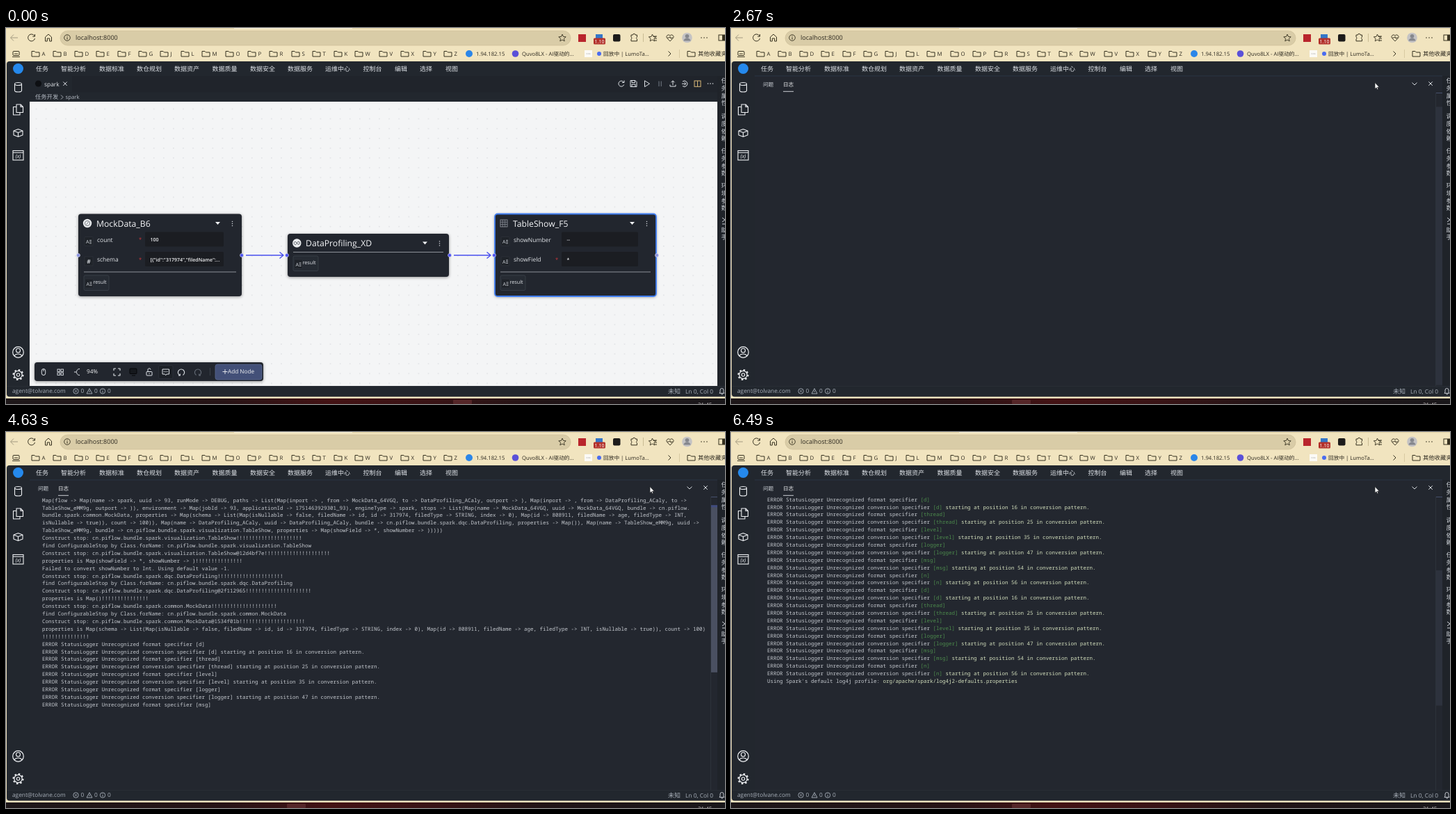
An HTML page that plays this animation: 1034 by 541 pixels, repeating every 8 s.

```html
<!DOCTYPE html>
<html lang="zh-CN">
<head>
<meta charset="utf-8">
<title>Task flow run</title>
<style>
html, body { margin: 0; width: 100%; height: 100%; overflow: hidden; background: #f1e4bf; }
svg { display: block; width: 100vw; height: 100vh; }
text { font-family: "Open Sans", "Noto Sans CJK SC", "Noto Sans CJK", sans-serif; white-space: pre; text-rendering: geometricPrecision; }
#log text { font-family: "Noto Sans Mono", "DejaVu Sans Mono", monospace; font-size: 7.5px; fill: #c3c7cd; }
#log.lit .key { fill: #4c8a4c; }
#log.lit .tail { fill: #d3dfbd; }
</style>
</head>
<body>
<svg id="stage" viewBox="0 0 1034 541" preserveAspectRatio="none">
  <defs>
    <pattern id="dots" x="37" y="110" width="14.1" height="14.1" patternUnits="userSpaceOnUse">
      <rect x="6" y="6" width="1" height="1" fill="#bfc2c9"/>
    </pattern>
    <linearGradient id="task">
      <stop offset="0" stop-color="#1d1719"/><stop offset=".3" stop-color="#261315"/>
      <stop offset=".45" stop-color="#431214"/><stop offset=".6" stop-color="#381315"/>
      <stop offset=".75" stop-color="#211416"/><stop offset="1" stop-color="#19171a"/>
    </linearGradient>
    <clipPath id="logClip"><rect x="34" y="93" width="979" height="421"/></clipPath>
    <filter id="soft" x="-20%" y="-20%" width="140%" height="150%">
      <feDropShadow dx="0" dy="1" stdDeviation="2" flood-color="#000" flood-opacity=".4"/>
    </filter>
  </defs>
  <g id="browser"></g>
  <g id="app"></g>
  <g id="flow"></g>
  <g id="panel">
    <g id="panelHead"></g>
    <g clip-path="url(#logClip)"><g id="log"></g></g>
  </g>
  <g id="tip"></g>
  <path id="cursor" d="M0 0V9.2L2.1 7.3L3.5 10.3L4.9 9.7L3.6 6.7H6.4Z" fill="#fff" stroke="#16181c" stroke-width=".7"/>
</svg>
<script>
const NS = 'http://www.w3.org/2000/svg';
const $ = id => document.getElementById(id);
let layer;

function add(tag, attrs, parent = layer) {
  const el = document.createElementNS(NS, tag);
  set(el, attrs);
  parent.appendChild(el);
  return el;
}
function set(el, attrs) {
  for (const k in attrs) el.setAttribute(k, attrs[k]);
}
const rect = (x, y, width, height, fill, more) => add('rect', { x, y, width, height, fill, ...more });
const disc = (cx, cy, r, fill, more) => add('circle', { cx, cy, r, fill, ...more });
const ring = (cx, cy, r, stroke, w = 1) => disc(cx, cy, r, 'none', { stroke, 'stroke-width': w });
const line = (d, stroke = '#dfe3e8', w = 1, more) =>
  add('path', { d, fill: 'none', stroke, 'stroke-width': w, 'stroke-linejoin': 'round', ...more });
// y is the vertical middle of the text
function label(x, y, str, size, fill, more) {
  const el = add('text', { x, y: y + size * 0.36, 'font-size': size, fill, ...more });
  el.textContent = str;
  return el;
}

function drawBrowser() {
  layer = $('browser');
  const ink = '#35301f';
  rect(0, 0, 1034, 541, '#f1e4bf');
  rect(0, 0, 1034, 1.2, '#e6d7ac');
  rect(328, 0, 170, 1.2, '#f8f0d8');
  line('M17 14H7M11 9.5L6.5 14L11 18.5', '#a39a80');
  line('M41 11.5A5 5 0 1 0 41.5 15M41.5 9V12.2H38.3', ink);
  line('M56.5 19V13L61 9L65.5 13V19H62.7V15H59.3V19Z', ink);
  rect(78, 4, 734, 21, '#d9cca7', { rx: 10.5, stroke: '#c9bb94', 'stroke-width': .6 });
  ring(88, 14, 4.3, ink, .9);
  line('M88 13.3V16.5M88 11.3V12.2', ink);
  label(100, 14, 'localhost:8000', 9, '#2c281f');
  const star = (x, y) => line(`M${x} ${y - 5}l1.5 3.4 3.7.4-2.8 2.5.8 3.6-3.2-1.9-3.2 1.9.8-3.6-2.8-2.5 3.7-.4Z`, ink, .9);
  star(800, 14);
  rect(823, 9, 11, 11, '#b9252c');
  rect(848, 9, 10, 9, '#3577c8');
  rect(845, 14.5, 17, 9, '#b3322c', { rx: 1.5 });
  label(853.5, 19.2, '1.10', 7, '#fff', { 'text-anchor': 'middle' });
  rect(873, 9, 10.5, 10.5, '#1c1b1a', { rx: 2 });
  line('M899 10H901.5A1.7 1.7 0 0 1 905 10H907.5V13A1.7 1.7 0 0 0 907.5 16V18.8H899V16A1.7 1.7 0 0 0 899 13Z', ink);
  line('M916.5 8V20', '#c9bb94');
  star(929.5, 14);
  line('M931 12H936M933 15H936M933 18H936', ink);
  line('M955 19L950.5 14.5A2.8 2.8 0 0 1 955 11A2.8 2.8 0 0 1 959.5 14.5ZM951 14H954L955 12.5L956.5 15.5L957 14H959', ink, .9);
  disc(979.5, 14, 7.3, '#c4c3c4');
  disc(979.5, 11.8, 2.8, '#85878d');
  add('path', { d: 'M974.5 18.5A5 4 0 0 1 984.5 18.5Z', fill: '#85878d' });
  [1000, 1004, 1008].forEach(x => disc(x, 14, .8, ink));
  rect(1025, 10, 12, 8, 'none', { stroke: ink });
  rect(1030, 10, 6, 8, ink);

  rect(10, 33.5, 9, 6, 'none', { stroke: ink, rx: 1 });
  line('M9 41.5H20M12 37H17', ink, .9);
  const folder = x => line(`M${x} 33.5H${x + 4}L${x + 5.5} 35H${x + 11}V41H${x}Z`, ink, 1);
  const starts = [37, 68, 99, 130, 161, 191, 222, 252, 282, 316, 348, 379, 411, 441, 472, 502, 537, 568, 600, 630];
  [...'ABDEFGJLMOPRSTKWVXYZ'].forEach((c, i) => {
    folder(starts[i]);
    label(starts[i] + 14.5, 37, c, 7.8, '#2c281f');
  });
  const mark = (x, text, cx, r, color) => { disc(cx, 37, r, color); label(x, 37, text, 7.7, '#2c281f'); };
  mark(676, '1.94.182.15', 666, 5, '#2b86e8');
  mark(742, 'Quvo8LX - AI驱动的...', 732.5, 4.8, '#5a50d8');
  rect(832, 32, 11, 10, '#fbfaf6');
  label(837.5, 37, 'note', 3, '#999', { 'text-anchor': 'middle' });
  mark(859, '回放中 | LumoTa...', 853, 3, '#4a6cf0');
  line('M952.5 33.5L956 37L952.5 40.5', ink);
  line('M968.5 31V43', '#d8caa2');
  folder(980);
  label(995, 37, '其他收藏夹', 8.3, '#2c281f');

  rect(0, 533, 1034, 8, 'url(#task)');
  rect(643, 535, 27, 6, '#552628', { id: 'taskSpot', rx: 1 });
  label(995, 542, '21:45', 8, '#c9c4c4');
}

function drawApp() {
  layer = $('app');
  rect(1, 48, 1040, 482.5, '#22272e', { rx: 4 });
  rect(34, 69, 989, 37, '#20242b');
  rect(34, 92.5, 989, 13.5, '#22272e');
  rect(1023, 69, 11, 446, '#1f2329');
  rect(1, 515, 1033, .7, '#2b3038');
  disc(17.5, 58.5, 7.5, '#2589ec');
  const menu = { 43: '任务', 79: '智能分析', 134: '数据标准', 188: '数仓规划', 242: '数据资产', 296.5: '数据质量', 351: '数据安全',
    405: '数据服务', 459: '运维中心', 513.5: '控制台', 559: '编辑', 595: '选择', 632: '视图' };
  for (const x in menu) label(+x, 59, menu[x], 9, '#dfe3e8');

  const side = '#eef0f3';
  line('M12.5 80.5A5 2 0 0 1 22.5 80.5A5 2 0 0 1 12.5 80.5V90A5 2 0 0 0 22.5 90V80.5', side, 1.1);
  line('M15 110H21L24.5 113.5V121.5H15ZM21 110V113.5H24.5M15 113.5H10.5V125H20V121.5', side, 1.1);
  line('M17.5 145.5L24 148V154L17.5 156.5L11 154V148ZM11 148L17.5 150.5L24 148M17.5 150.5V156.5', side, 1.1);
  rect(10, 176.5, 15, 13.5, 'none', { stroke: side, 'stroke-width': 1.1 });
  line('M10 179.3H25', side);
  label(17.5, 184.5, '(x)', 7.5, side, { 'text-anchor': 'middle', 'font-style': 'italic' });
  ring(17.5, 466.5, 7.8, side, 1.2);
  ring(17.5, 464, 3, side, 1.1);
  line('M12 472A6 5 0 0 1 23 472', side, 1.1);
  ring(17.5, 499, 2.2, side, 1.1);
  ring(17.5, 499, 5.6, side, 1.2);
  disc(17.5, 499, 7, 'none', { stroke: side, 'stroke-width': 2, 'stroke-dasharray': '2.5 3' });

  const dim = '#a9b0ba';
  label(9, 522.5, 'agent@tolvane.com', 8.3, dim);
  ring(100.5, 522.5, 3.7, dim, .9);
  line('M99 521L102 524M102 521L99 524', dim, .8);
  label(107.5, 522.5, '0', 8.3, dim);
  line('M120 518.7L124 526H116ZM120 521.5V524', dim, .9);
  label(127, 522.5, '0', 8.3, dim);
  ring(139, 522.5, 3.7, dim, .9);
  line('M139 522V524.7M139 520.3V521', dim, .9);
  label(146, 522.5, '0', 8.3, dim);
  label(952, 522.5, '未知', 9, dim);
  label(977, 522.5, 'Ln 0, Col 0', 8.4, dim);
  line('M1026 525.5L1027 524V521A2.5 2.5 0 0 1 1032 521V524L1033 525.5ZM1028.5 527H1031', '#d5d9df', .9);

  [['任务属性', 76], ['调度依赖', 127], ['任务参数', 177], ['环境参数', 227]].forEach(([word, y]) =>
    [...word].forEach((c, i) => label(1028.5, y + i * 10.7, c, 9, '#cfd3d9')));
  line('M1030 273L1034 276L1030 279M1030 282H1034', '#cfd3d9');
  label(1028.5, 290.5, '助', 9, '#cfd3d9');
  label(1028.5, 301, '手', 9, '#cfd3d9');
}

function typeIcon(x, y) {
  rect(x, y, 12, 13, '#1f2329', { stroke: '#343942', 'stroke-width': .5, rx: 1 });
  label(x + 2, y + 7, 'A', 7, '#d5d9df');
  line(`M${x + 7} ${y + 5}h3M${x + 7} ${y + 7.2}h3M${x + 7} ${y + 9.4}h3`, '#d5d9df', .8);
}
function chip(x, y) {
  rect(x, y, 36, 21.5, '#262b33', { stroke: '#3c424b', 'stroke-width': .8, rx: 2 });
  typeIcon(x + 1.5, y + 5);
  label(x + 13.5, y + 9.5, 'result', 7.2, '#e2e5e9');
}
function field(x, y, name, value, star, inputX, icon = 'A') {
  if (icon === 'A') typeIcon(x + 9, y - 4);
  else {
    rect(x + 9, y - 4, 12, 13, '#1f2329', { stroke: '#343942', 'stroke-width': .5 });
    label(x + 15, y + 2.5, '#', 8.5, '#e2e5e9', { 'text-anchor': 'middle', 'font-weight': 600 });
  }
  label(x + 27, y, name, 8.5, '#e2e5e9');
  if (star) label(inputX - 9, y, '*', 7.5, '#d2383c');
  rect(inputX, y - 11, inputX < 400 ? 113 : 110, 21, '#1b1d22', { rx: 1.5 });
  label(inputX + 7.5, y, value, 7, '#f1f2f4', { 'font-weight': 600 });
}
function node(x, y, w, h, title, lineY, picked) {
  rect(x, y, w, h, '#21252d', { rx: 4, filter: 'url(#soft)' });
  if (picked) rect(x, y, w, h, 'none', { rx: 4, stroke: '#3f7df2', 'stroke-width': 1.8 });
  label(x + 26, y + 14, title, 12.2, '#f5f6f8');
  const end = x + w;
  add('path', { d: `M${end - 38} ${y + 11.5}h7l-3.5 4Z`, fill: '#f0f1f3' });
  [-3, 0, 3].forEach(d => disc(end - 13.5, y + 14 + d, .75, '#d5d9df'));
  line(`M${x + 8} ${lineY}H${end - 8}`, '#8d9198', 1);
}
const arrow = (from, to) => line(`M${from} 327H${to}M${to - 5.5} 322.5L${to} 327L${to - 5.5} 331.5`, '#4a50ee', 1.4);

function drawFlow() {
  layer = $('flow');
  const ink = '#dfe3e8';
  rect(34, 106, 989, 409, '#f4f5f6');
  rect(34, 106, 989, 409, 'url(#dots)');
  rect(34, 69, 61, 23.5, '#22272e');
  disc(46.5, 80, 4.6, '#0e1013');
  label(55, 81, 'spark', 8.4, '#e2e5e9');
  line('M82.3 77.5L87.7 82.9M87.7 77.5L82.3 82.9', ink);
  label(42, 99.5, '任务开发', 8.3, '#b7bdc6');
  line('M79 96.5L82 99.5L79 102.5', '#b7bdc6', .9);
  label(85.5, 99.5, 'spark', 7.8, '#b7bdc6');
  line('M888.3 78A4 4 0 1 0 888.7 81.5M889 75.5V78.5H886', ink);
  line('M898 75.5H905L907 77.5V84.5H898ZM900 75.5V78.5H904.5V75.5M900 84.5V81H905V84.5', ink);
  line('M918.5 75.8L925.5 80.2L918.5 84.6Z', ink);
  line('M939 76.5V84M942.3 76.5V84', '#666d77', 1.2);
  line('M955 81.5V84H963V81.5M959 82V76M956.5 78.3L959 75.8L961.5 78.3', ink);
  line('M973 77A4.2 4.2 0 1 1 973 83.5M972 80.2H977.5M975.5 78L977.8 80.2L975.5 82.4', ink);
  rect(990, 76, 9, 8.3, 'none', { stroke: '#d9b878', 'stroke-width': 1 });
  line('M994.5 76V84.3', '#d9b878');
  [1009.5, 1013, 1016.5].forEach(x => disc(x, 80, .8, ink));

  node(104, 267.5, 235, 118.5, 'MockData_B6', 351);
  disc(117, 281, 6.2, '#eceef0');
  ring(117, 281, 3.6, '#747980', 1);
  line('M115.5 283L118.5 279', '#747980', .9);
  field(104, 304.5, 'count', '100', true, 200);
  field(104, 333, 'schema', '[{"id":"317974","filedName":...', true, 200, '#');
  chip(112, 356);
  node(405, 296, 232, 62, 'DataProfiling_XD', 322.5);
  disc(418.3, 309.5, 6.2, '#eceef0');
  line('M418.3 309.5C415 305 413 309.5 415 311.3S418.3 309.5 418.3 309.5S420 306 421.6 307.7S421.6 314 418.3 309.5', '#50555d', 1);
  chip(413, 328);
  node(703, 267.5, 232, 118.5, 'TableShow_F5', 351, true);
  rect(711, 276, 10, 10, 'none', { stroke: '#8a8f97', 'stroke-width': .9 });
  line('M711 279.3H721M711 282.6H721M714.3 276V286M717.6 276V286', '#8a8f97', .8);
  field(703, 304.5, 'showNumber', '--', false, 799);
  field(703, 333, 'showField', '*', true, 799);
  chip(711, 356);
  arrow(345, 399);
  arrow(644, 697);
  [104, 339, 404, 638, 702, 936].forEach((x, i) =>
    disc(x, 327, 2.5, i % 5 ? '#4a50ee' : '#8790dc', { stroke: '#dfe2f5', 'stroke-width': .6 }));

  rect(41, 481, 329, 27, '#22262e', { rx: 4, filter: 'url(#soft)' });
  rect(51.3, 490.5, 5.4, 9, 'none', { rx: 2.7, stroke: ink });
  line('M54 491V494', ink);
  [[74, 491, 3.4], [79, 491, 3.4], [74, 496, 3.4], [79, 496, 3.4]].forEach(([x, y, s]) =>
    rect(x, y, s, s, 'none', { stroke: ink, 'stroke-width': .9 }));
  line('M98 495H101M106 490.5C101 490.5 102 495 101 495C102 495 101 499.5 106 499.5', ink);
  label(116, 494.5, '94%', 8.2, '#f0f1f3');
  line('M155 493V490H158M161 490H164V493M164 497V500H161M158 500H155V497', ink, 1.1);
  rect(178, 490, 10, 7.5, '#15181d', { stroke: '#050608', rx: 1 });
  line('M181 500H186', '#050608');
  rect(202, 494.5, 8, 5.5, 'none', { stroke: ink, rx: .7 });
  line('M204 494.5V492A2 2 0 0 1 208 491.5M206 496.5V498', ink);
  rect(219.5, 485.5, 20.5, 19, '#1d2127', { rx: 2, stroke: '#31363f', 'stroke-width': .7 });
  line('M225 491H234.5V498H231L229.7 499.7L228.5 498H225Z', ink);
  [227.5, 229.8, 232].forEach(x => disc(x, 494.5, .7, ink));
  const loop = (x, s, color) => line(`M${x - 2.5 * s} 499.5A4.6 4.6 0 1 ${s > 0 ? 1 : 0} ${x + 2.5 * s} 499.5M${x - 4 * s} 500H${x - 1.7 * s}V497.5`, color, 1.1);
  loop(252, 1, ink);
  loop(276, -1, '#666d77');
  line('M293.5 489V500', '#3a3f48');
  rect(301, 484, 67, 22, '#435078', { rx: 3, stroke: '#59678f', 'stroke-width': .8 });
  line('M311.5 494.5H318.5M315 491V498', '#f0f1f3', .9);
  label(319, 494.5, 'Add Node', 8.2, '#f0f1f3');
}

function buildLines() {
  const bang = n => '!'.repeat(n);
  const lines = [
    'Map(flow -> Map(name -> spark, uuid -> 93, runMode -> DEBUG, paths -> List(Map(inport -> , from -> MockData_64VGQ, to -> DataProfiling_ACaly, outport -> ), Map(inport -> , from -> DataProfiling_ACaly, to ->',
    'TableShow_eMM9g, outport -> )), environment -> Map(jobId -> 93, applicationId -> 1751463929301_93), engineType -> spark, stops -> List(Map(name -> MockData_64VGQ, uuid -> MockData_64VGQ, bundle -> cn.piflow.',
    'bundle.spark.common.MockData, properties -> Map(schema -> List(Map(isNullable -> false, filedName -> id, id -> 317974, filedType -> STRING, index -> 0), Map(id -> 808911, filedName -> age, filedType -> INT,',
    'isNullable -> true)), count -> 100)), Map(name -> DataProfiling_ACaly, uuid -> DataProfiling_ACaly, bundle -> cn.piflow.bundle.spark.dqc.DataProfiling, properties -> Map()), Map(name -> TableShow_eMM9g, uuid ->',
    'TableShow_eMM9g, bundle -> cn.piflow.bundle.spark.visualization.TableShow, properties -> Map(showField -> *, showNumber -> )))))'
  ];
  const stop = (name, hash) => lines.push(
    `Construct stop: cn.piflow.bundle.spark.${name}${bang(21)}`,
    `find ConfigurableStop by Class.forName: cn.piflow.bundle.spark.${name}`,
    `Construct stop: cn.piflow.bundle.spark.${name}@${hash}${bang(21)}`);
  stop('visualization.TableShow', '12d4bf7e');
  lines.push('properties is Map(showField -> *, showNumber -> )' + bang(15),
    'Failed to convert showNumber to Int. Using default value -1.');
  stop('dqc.DataProfiling', '2f112965');
  lines.push('properties is Map()' + bang(15));
  stop('common.MockData', '1534f01b');
  lines.push('properties is Map(schema -> List(Map(isNullable -> false, filedName -> id, id -> 317974, filedType -> STRING, index -> 0), Map(id -> 808911, filedName -> age, filedType -> INT, isNullable -> true)), count -> 100)',
    bang(15));
  const specs = { d: 16, thread: 25, level: 35, logger: 47, msg: 54, n: 56 };
  for (let pass = 0; pass < 2; pass++)
    for (const s in specs) lines.push(
      `ERROR StatusLogger Unrecognized format specifier |[${s}]`,
      `ERROR StatusLogger Unrecognized conversion specifier |[${s}]| starting at position ${specs[s]} in conversion pattern.`);
  lines.push("Using Spark's default log4j profile: ||org/apache/spark/log4j2-defaults.properties");
  return lines;
}

const LINE = 10.89, VIEW = 421, TOP = 93;
let rows, slider, band, taskSpot;

function drawPanel() {
  layer = $('panelHead');
  rect(34, 69, 989, 446, '#23272f');
  line('M34 69H1023', '#2c394b', .8);
  label(46, 81, '问题', 7.6, '#cfd3d9');
  label(75, 81, '日志', 7.6, '#f0f1f3');
  line('M75 91.3H90', '#dfe3e8', .9);
  line('M979.5 78.7L983 82L986.5 78.7');
  line('M1003.3 77.3L1008.8 82.8M1008.8 77.3L1003.3 82.8');
  line('M1013.5 93V515', '#2f353e', .8);
  line('M1014 93.5H1023', '#46506c', 1);
  slider = rect(1014, TOP, 9, 0, '#4a5061');
  band = rect(1014, TOP, 9, 3, '#3c498a');

  layer = $('log');
  rows = buildLines().map((str, i) => {
    const el = label(52, 98 + i * LINE, '', 7.5, '#c3c7cd');
    str.split('|').forEach((part, k) => {
      add('tspan', { class: ['', 'key', 'tail'][k] }, el).textContent = part;
    });
    return el;
  });

  layer = $('tip');
  rect(908.5, 96, 29.5, 21.5, '#1f2329', { rx: 2, filter: 'url(#soft)' });
  label(923, 106.7, '运行', 9, '#e2e5e9', { 'text-anchor': 'middle' });
}

// [time, number of log lines shown]
const growth = [[3680, 5], [3740, 7], [3810, 8], [3870, 10], [3930, 12], [4000, 14], [4060, 16], [4110, 17], [4180, 19],
  [4360, 20], [4420, 22], [4490, 24], [4560, 26], [4630, 28], [4690, 30], [4760, 33], [4820, 35], [4890, 37],
  [4960, 39], [5030, 41], [5090, 43], [5440, 44]];
// [time, x, y]
const path = [[100, 962, 393], [290, 948, 316], [490, 918, 190], [650, 890, 86], [710, 892, 67], [890, 926, 78.5]];

function cursorAt(t) {
  let i = 0;
  while (i < path.length - 2 && t > path[i + 1][0]) i++;
  const [a, ax, ay] = path[i], [b, bx, by] = path[i + 1];
  const p = clamp((t - a) / (b - a));
  return [ax + (bx - ax) * p, ay + (by - ay) * p];
}
const show = (el, on) => el.setAttribute('visibility', on ? 'visible' : 'hidden');
const clamp = v => Math.min(1, Math.max(0, v));

const FAINT = .28;
function sliderGlow(t) {
  if (t < 2410) return 1;
  if (t < 2670) return .6;
  if (t < 3680) return FAINT;
  if (t < 6190) return 1;
  return t < 6490 ? .6 : FAINT;
}

function render(t) {
  const open = t >= 1630;
  show($('flow'), !open);
  $('panel').style.display = open ? '' : 'none';
  const tipOn = clamp((t - 945) / 45) * (1 - clamp((t - 1630) / 140));
  $('tip').setAttribute('opacity', tipOn);
  taskSpot.setAttribute('x', t < 1250 ? 643 : 404);
  show($('cursor'), t >= 100);
  $('cursor').setAttribute('transform', `translate(${cursorAt(t)})`);

  let count = 0;
  for (const [at, n] of growth) if (t >= at) count = n;
  rows.forEach((el, i) => el.style.display = i < count ? '' : 'none');
  // the view recentres once the newest line falls below the pane
  const centred = count > 38;
  const shift = centred ? 208 : 0;
  $('log').setAttribute('transform', `translate(0 ${-shift})`);
  $('log').setAttribute('class', centred ? 'lit' : '');

  // two earlier blank lines stay above the visible text
  const total = (Math.max(3, count + 2) - 1) * LINE + VIEW;
  const y = TOP + (21.5 + shift) * VIEW / total;
  const glow = sliderGlow(t);
  set(slider, { y, height: VIEW * VIEW / total, opacity: glow });
  set(band, { y, height: centred ? 6 : 3, opacity: count && glow === 1 ? .7 : 0 });
}

drawBrowser();
drawApp();
drawFlow();
drawPanel();
taskSpot = $('taskSpot');
const start = performance.now();
function tick() {
  render((performance.now() - start) % 8000);
  requestAnimationFrame(tick);
}
tick();
</script>
</body>
</html>
```
